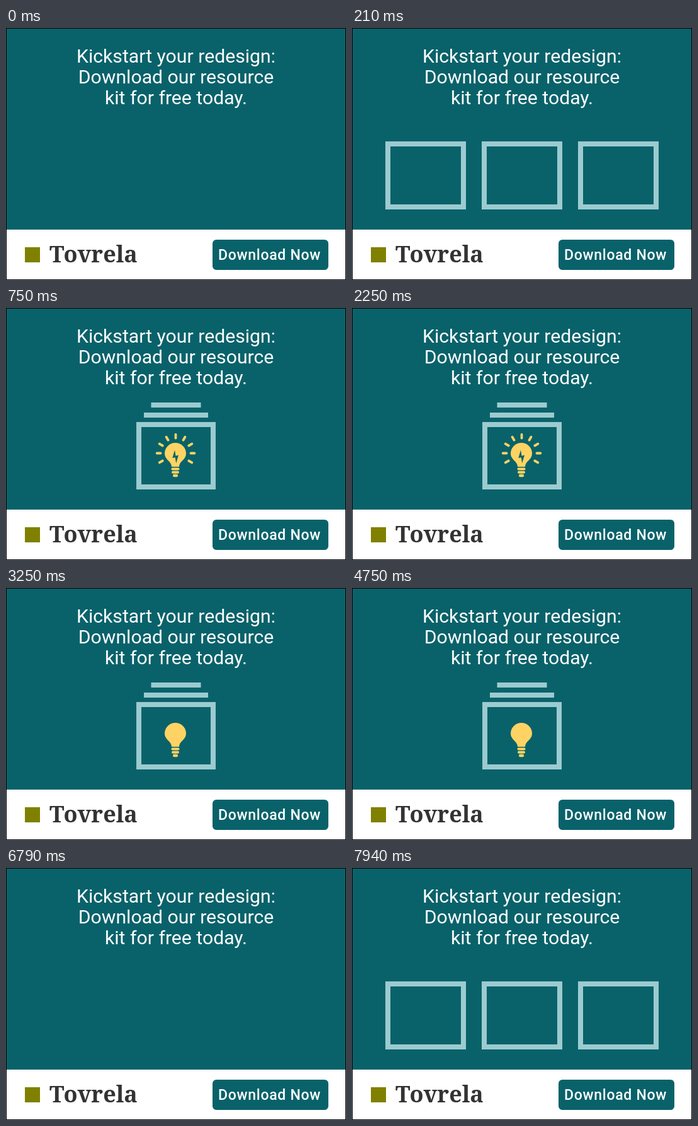
Write an HTML page that moves like this. It is 540 px wide and 400 px high and loops after 8 s.

```html
<!DOCTYPE html>
<html lang="en">
<head>
<meta charset="utf-8">
<title>Resource kit banner</title>
<style>
  html, body { margin: 0; width: 100%; height: 100%; overflow: hidden; }
  svg { display: block; width: 540px; height: 400px; }
  .headline { font: 400 30.2px Roboto, sans-serif; fill: #fff; text-anchor: middle; }
  .cta { font: 500 23px Roboto, sans-serif; letter-spacing: .7px; fill: #fff; }
  .brand { font: 900 36px "Noto Serif", serif; fill: #333; }
  .frame { fill: none; stroke: #9ccbd0; stroke-width: 8; }
  .layer { fill: #9ccbd0; }
  .lamp { fill: #ffd363; }
  .rays { stroke: #ffd363; stroke-width: 3.8; stroke-linecap: round; }
</style>
</head>
<body>
<svg viewBox="0 0 540 400">
  <rect width="540" height="400" fill="#fff"/>
  <rect width="540" height="320" fill="#09626a"/>
  <g class="headline">
    <text x="270" y="55">Kickstart your redesign:</text>
    <text x="270" y="88">Download our resource</text>
    <text x="270" y="121">kit for free today.</text>
  </g>
  <g id="art">
    <rect class="frame"/>
    <rect class="frame"/>
    <rect class="frame"/>
    <rect id="low" class="layer" x="219" width="102" height="8"/>
    <rect id="top" class="layer" x="230.5" width="79" height="8"/>
    <g id="lamp" class="lamp">
      <path d="M-6 252C-6 243-17 241-17 231A17 17 0 0 1 17 231C17 241 6 243 6 252Z"/>
      <rect x="-6.5" y="253.5" width="13" height="4" rx="2"/>
      <rect x="-6" y="258.7" width="12" height="4" rx="2"/>
      <rect x="-4" y="263.8" width="8" height="4.4" rx="2"/>
    </g>
    <g id="rays" class="rays"></g>
    <path id="bolt" fill="#09626a" d="M268 225.5L264.3 238L268.7 237.2L270.2 246.5L274 233.5L269.6 234.7Z"/>
  </g>
  <rect x="30" y="348" width="24" height="24" fill="#808000"/>
  <text class="brand" x="69" y="372">Tovrela</text>
  <rect x="328" y="336" width="184" height="48" rx="6" fill="#09626a"/>
  <text class="cta" x="337" y="368">Download Now</text>
  <rect x=".5" y=".5" width="539" height="399" fill="none" stroke="#000"/>
</svg>
<script>
const LOOP = 8000, STEP = 30;
const $ = id => document.getElementById(id);
const frames = [...document.querySelectorAll('.frame')];

const rays = [];
for (let angle = -120; angle <= 120; angle += 30) {
  const line = document.createElementNS('http://www.w3.org/2000/svg', 'line');
  line.setAttribute('transform', `translate(269.5 230.5) rotate(${angle})`);
  line.setAttribute('y1', -24);
  $('rays').append(line);
  rays.push(line);
}

// Each track lists [step, value] pairs, joined linearly.
const ENTER = {
  fade: [[0, .3], [2, 1]],
  spread: [[0, 176], [2, 172], [5, 153], [7, 95], [9, 0]],
  grow: [[11, 1], [14, 0]],
  low: [[8, 180], [11, 165], [13, 166]],
  top: [[8, 180], [10, 166], [11, 157], [12, 150]],
  lamp: [[9, 0], [11, .65], [13, 1]],
  rays: [[13, 0], [18, 1]],
  bolt: [[21, 0], [22, 1]]
};
const EXIT = {
  fade: [[12, 1], [18, 0]],
  spread: [[0, 0]],
  grow: [[4, 0], [7, 1]],
  low: [[8, 166], [11, 180]],
  top: [[6, 150], [8, 165], [11, 180]],
  lamp: [[4, 1], [8, 0]],
  rays: [[0, 1], [4, 0]],
  bolt: [[0, 0]]
};

function sample(track, k) {
  if (k <= track[0][0]) return track[0][1];
  for (let i = 1; i < track.length; i++) {
    const [a, from] = track[i - 1], [b, to] = track[i];
    if (k <= b) return from + (to - from) * (k - a) / (b - a);
  }
  return track[track.length - 1][1];
}

function pose(tracks, ms) {
  const k = Math.floor(ms / STEP);
  return Object.fromEntries(Object.entries(tracks).map(([name, track]) => [name, sample(track, k)]));
}

function poseAt(t) {
  if (t < 60) return { ...pose(ENTER, 0), fade: 0 };
  if (t >= 7790) return pose(ENTER, Math.min(t - 7790, 150));
  if (t >= 6250) return pose(EXIT, t - 6250);
  const p = pose(ENTER, t - 60);
  const dark = t >= 1750 && (t - 1750) % 1500 < 500;
  return dark ? { ...p, rays: 0, bolt: 0 } : p;
}

function draw(t) {
  const p = poseAt(t);
  $('art').setAttribute('opacity', p.fade);
  frames.forEach((frame, i) => {
    frame.setAttribute('x', 211 - p.grow + (i - 1) * p.spread);
    frame.setAttribute('y', 185 - p.grow);
    frame.setAttribute('width', 118 + 2 * p.grow);
    frame.setAttribute('height', 99 + p.grow);
    frame.style.display = i === 1 || p.spread ? '' : 'none';
  });
  $('low').setAttribute('y', p.low);
  $('top').setAttribute('y', p.top);
  $('lamp').setAttribute('transform', `translate(269 0) scale(${p.lamp} 1)`);
  $('rays').style.display = p.rays ? '' : 'none';
  rays.forEach(line => line.setAttribute('y2', -24 - 5.8 * p.rays));
  $('bolt').setAttribute('opacity', p.bolt);
}

const start = performance.now();
function tick() {
  draw((performance.now() - start) % LOOP);
  requestAnimationFrame(tick);
}
tick();
</script>
</body>
</html>
```
